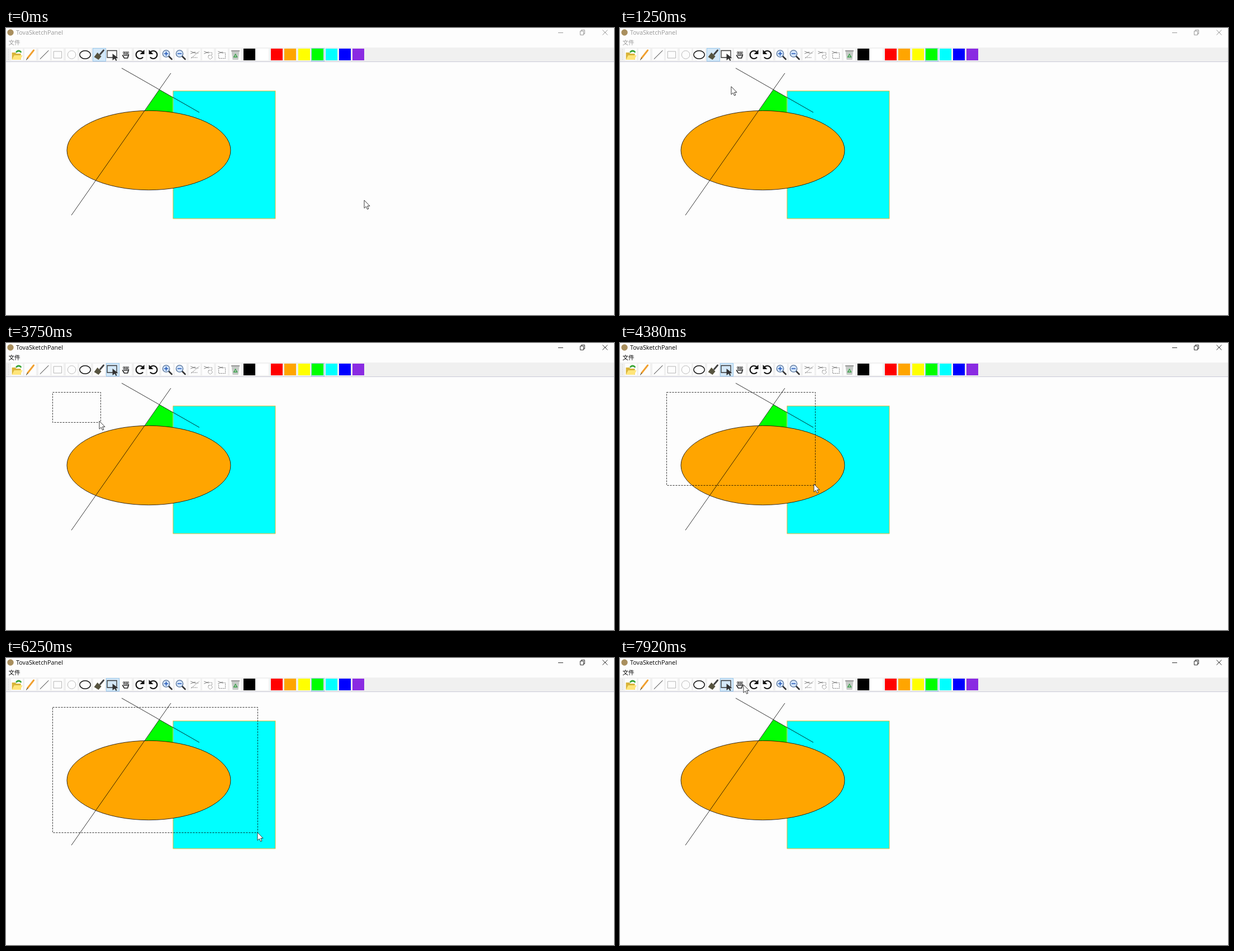
Write an HTML page that moves like this. It is 1088x515 px and loops after 8 s.

```html
<!DOCTYPE html>
<html lang="zh">
<head>
<meta charset="utf-8">
<style>
html, body { margin: 0; width: 100%; height: 100%; overflow: hidden; background: #fdfdfd; }
svg { display: block; }
text { font: 10.8px "Open Sans", "Noto Sans", sans-serif; }
.cjk { font: 10.5px "Noto Sans CJK SC", "Noto Sans CJK", sans-serif; }
</style>
</head>
<body>
<svg width="1088" height="515" viewBox="0 0 1088 515">
  <circle cx="8" cy="8" r="5.7" fill="#a98f5e"/>
  <g id="caption">
    <text x="18" y="12">TovaSketchPanel</text>
    <text x="4.5" y="30.3" class="cjk">文件</text>
  </g>
  <g id="controls" fill="none">
    <path d="M988 8.5h9M1027.5 5.5h6v7h-6zM1029.5 5v-1.5h6v7h-2M1067.5 3.5l9 9m0-9l-9 9"/>
  </g>
  <rect y="35" width="1088" height="25" fill="#f0f0f0"/>
  <path d="M0 60.5h1088" stroke="#c9c9d8"/>
  <path d="M4.5 38v20" stroke="#c8c8c8" stroke-dasharray="1 2"/>
  <g id="tools"></g>

  <g fill="none" stroke="#000" stroke-width=".8">
    <rect x="299" y="113" width="183" height="229" fill="#0ff" stroke="#ffa500"/>
    <path d="M274.5 110.5L298.5 124.5V153L248 149Z" fill="#0f0" stroke="none"/>
    <ellipse cx="255.5" cy="219.5" rx="146.5" ry="71.2" fill="#ffa500"/>
    <path d="M207 72L346 151.5M295 81L117 336"/>
    <rect id="marquee" x="83.5" y="88.5" stroke-dasharray="3 2"/>
  </g>
  <path id="cursor" d="M0 0V14.3L3.4 11.3L5.6 16.3L7.9 15.3L5.7 10.4H10Z" fill="#fff" stroke="#222" stroke-width=".9"/>
</svg>
<script>
const $ = id => document.getElementById(id);
const cellX = i => Math.round(19.7 + 24.47 * i);

const line = (d, color = '#222', width = 1) =>
  `<path d="${d}" fill="none" stroke="${color}" stroke-width="${width}" stroke-linecap="round"/>`;
const fill = (d, color) => `<path d="${d}" fill="${color}"/>`;
const oval = (rx, ry, color, width) =>
  `<ellipse rx="${rx}" ry="${ry}" fill="none" stroke="${color}" stroke-width="${width}"/>`;
const redo = line('M5 5A7 7 0 1 1 5-5', '#111', 2.2) + fill('M8-9V-1H0Z', '#111');
const lens = sign => line('M3 3L8 8', '#333', 2.6)
  + `<circle cx="-2" cy="-2" r="6.2" fill="#d5e6fb" stroke="#526f96" stroke-width="1.3"/>`
  + line(sign, '#2257b8', 1.7);
const snip = shape => line('M-7-6L1-3M-7-2L1-5', '#777', .9)
  + `<g stroke-dasharray="2 1.5">${line(shape, '#888', .9)}</g>`;
const fingers = [-4, -1.4, 1.4, 4].map(x => line(`M${x * .7} 1L${x}-4.5`, '#222', 2.6)
  + line(`M${x * .7} 1L${x}-4.5`, '#fff', 1)).join('');

// Toolbar drawings, each centred on 0,0
const icons = [
  fill('M-9-4h6l2 2h8V9H-9Z', '#d9b43a') + fill('M-9 9L-5 1H10L6 9Z', '#ffe57a') + line('M-1-5Q3-9 7-5', '#3aa537', 2.6),
  line('M-5 6L6-8', '#f0a030', 3) + line('M-7 9L-5 6', '#554', 1.3),
  line('M-7.5 7.5L7.5-7.5'),
  line('M-7-6H7V6H-7Z', '#b5b5b5'),
  oval(7.3, 7.3, '#bbb', 1),
  oval(9.7, 7.3, '#111', 1.5),
  line('M2-1L8-8', '#444', 3) + fill('M-3-4L4 3L-1 9L-9 4Z', '#56533f'),
  line('M-9.5-7.5H7.5V5H-9.5Z', '#333', 1.3) + fill('M0-2L10 6L6 6.5L8 10L6 11L4 7L0 10Z', '#333'),
  line('M-6 1L-3 6H3L5 0', '#222', 1.6) + fingers,
  redo,
  `<g transform="scale(-1 1)">${redo}</g>`,
  lens('M-5-2H1M-2-5V1'),
  lens('M-5-2H1'),
  snip('M-6 6L8-6M1-3H8M-6 5H5'),
  snip('M2-4H7V1M1 1h5l2 4l-4 3l-4-3Z'),
  snip('M1-3.5H6V6.5H-6V0'),
  fill('M-7-6H7L5 9H-5Z', '#c6cac7') + line('M-7-7H7', '#777', 1.6) + line('M-3 4L0-1L3 4Z', '#32a044', 1.3)
];
const inks = ['#000', '#fff', '#f00', '#ffa500', '#ff0', '#0f0', '#0ff', '#00f', '#8a2be2'];
const marks = { 6: 'brush', 7: 'select', 8: 'hand', 22: 'ink' };

function tile(i) {
  const x = cellX(i), ink = inks[i - icons.length];
  const mark = marks[i] ? `<rect id="${marks[i]}" x="${x - 11.5}" y="36.5" width="23" height="23" fill="#d4e8f8" stroke="#9ccbee"/>` : '';
  const square = `<rect x="${x - 11}" y="37" width="21" height="21" fill="${ink || '#fdfdfd'}"/>`;
  return ink ? mark + square : square + mark + `<g transform="translate(${x - .4} 48)">${icons[i]}</g>`;
}
$('tools').innerHTML = [...icons, ...inks].map((_, i) => tile(i)).join('');

// Pointer stops: time, x, y
const stops = [
  [90, 641, 309], [1250, 199, 105], [1650, 190, 47], [1900, 190, 47],
  [2580, 124, 160], [2840, 94, 92], [3460, 83, 88], [4380, 347, 253],
  [4750, 425, 326], [5050, 460, 300], [5300, 496, 301], [6250, 450, 313],
  [7220, 450, 313], [7840, 221, 48]
];

function pointerAt(t) {
  const next = stops.findIndex(s => s[0] > t);
  if (next === 0) return stops[0].slice(1);
  if (next < 0) return stops.at(-1).slice(1);
  const [t0, x0, y0] = stops[next - 1], [t1, x1, y1] = stops[next];
  const k = (t - t0) / (t1 - t0);
  return [Math.round(x0 + (x1 - x0) * k), Math.round(y0 + (y1 - y0) * k)];
}

const show = (id, on) => $(id).setAttribute('visibility', on ? 'visible' : 'hidden');

function draw(t) {
  const [x, y] = pointerAt(t);
  const active = t >= 1840;
  $('cursor').setAttribute('transform', `translate(${x} ${y})`);
  $('caption').setAttribute('fill', active ? '#000' : '#999');
  $('controls').setAttribute('stroke', active ? '#333' : '#999');
  show('brush', !active);
  show('select', active);
  show('hand', false);
  show('marquee', t > 3470 && t < 7220);

  // The selection corner runs slightly ahead of the drawn pointer
  const [right, bottom] = pointerAt(t + 8);
  $('marquee').setAttribute('width', Math.max(0, right - 83));
  $('marquee').setAttribute('height', Math.max(0, bottom - 88));
}

const start = performance.now();
function tick(now) {
  draw(Math.max(0, now - start) % 8000);
  requestAnimationFrame(tick);
}
draw(0);
requestAnimationFrame(tick);
</script>
</body>
</html>
```
